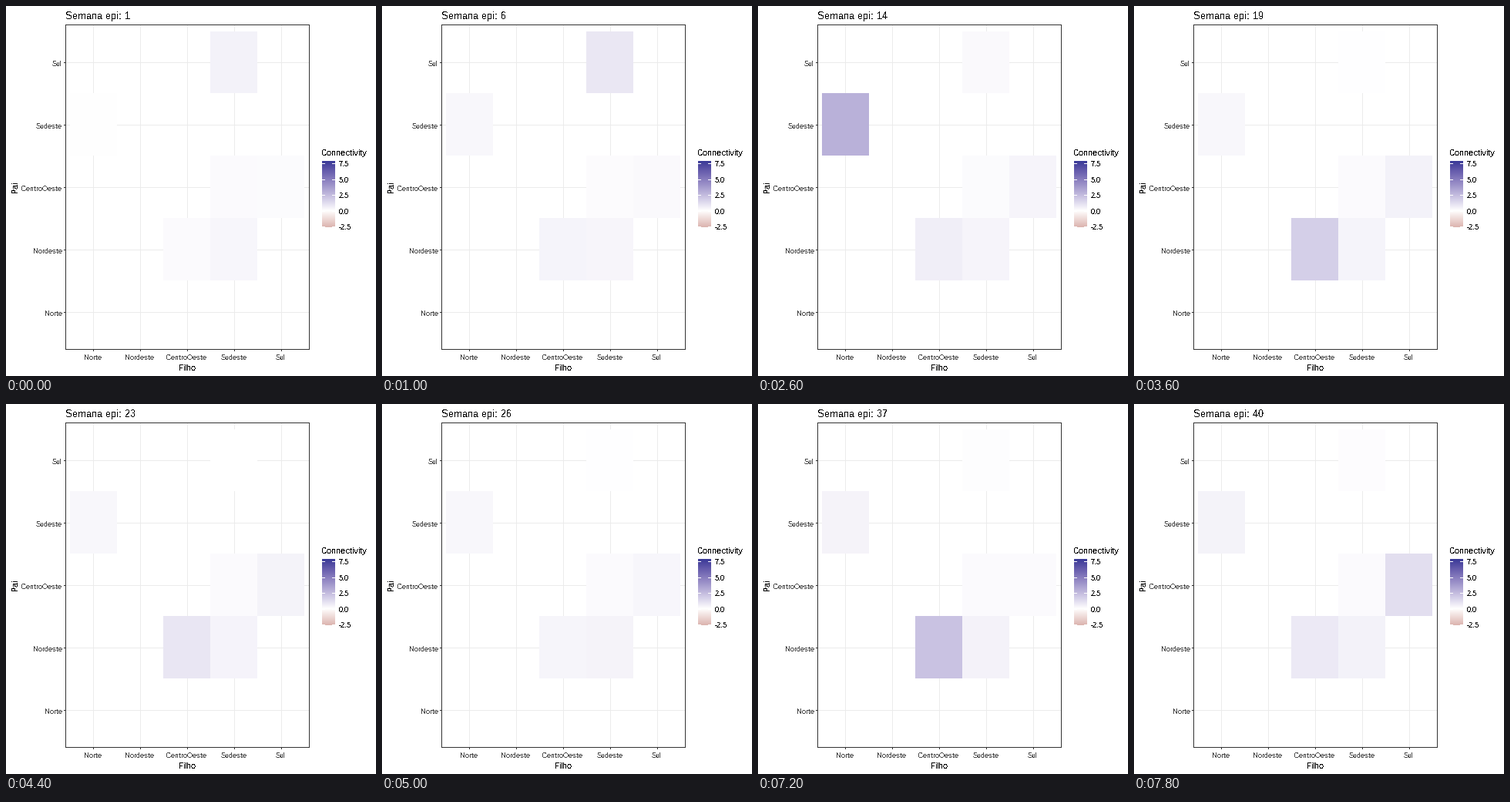
A matplotlib script for the animation above (8 s loop, 480 by 480 pixels).

```python
import numpy as np
import matplotlib.pyplot as plt
from matplotlib.animation import FuncAnimation
from matplotlib.patches import Rectangle

plt.rcParams.update({
    "font.family": "Liberation Sans",
    "text.hinting": "native",
    "text.hinting_factor": 1,
    "text.antialiased": False,
})

SIZE, DPI = 480, 100
WEEKS, STEP_MS = 40, 200
V_MIN, V_MAX = -2.6, 7.9
INK, FRAME, GREY, GRID = "#000000", "#333333", "#4d4d4d", "#ebebeb"
LEFT, TOP, RIGHT, BOTTOM = 77, 24, 394, 446
REGIONS = ["Norte", "Nordeste", "CentroOeste", "Sudeste", "Sul"]

# (child, parent): first level, last level, waves of (peak week, height, width)
FLOWS = {
    ("Sudeste", "Sul"): (-.1, .1, [(6, .97, 7)]),
    ("Norte", "Sudeste"): (.05, .45, [(12, 3.8, 3.5), (33, .4, 2)]),
    ("Sudeste", "CentroOeste"): (.17, .18, [(10, -.16, 3)]),
    ("Sul", "CentroOeste"): (.15, .15, [(10, .6, 2.5), (20, .34, 8), (40, 1.05, 1.5)]),
    ("CentroOeste", "Nordeste"): (.1, .28, [(4, .8, 2), (19, 1.6, 4.5), (36.5, 2.05, 3)]),
    ("Sudeste", "Nordeste"): (.33, .49, []),
}

RGB_XYZ = np.array([[.4124, .3576, .1805], [.2126, .7152, .0722], [.0193, .1192, .9505]])
WHITE_XYZ = RGB_XYZ.sum(axis=1)


def to_lab(rgb):
    c = np.array(rgb) / 255
    lin = np.where(c > .04045, ((c + .055) / 1.055) ** 2.4, c / 12.92)
    t = RGB_XYZ @ lin / WHITE_XYZ
    f = np.where(t > .008856, np.cbrt(t), 7.787 * t + 16 / 116)
    return np.array([116 * f[1] - 16, 500 * (f[0] - f[1]), 200 * (f[1] - f[2])])


def to_rgb(lab):
    fy = (lab[0] + 16) / 116
    f = np.array([fy + lab[1] / 500, fy, fy - lab[2] / 200])
    t = np.where(f > .2069, f ** 3, (f - 16 / 116) / 7.787)
    lin = np.clip(np.linalg.solve(RGB_XYZ, t * WHITE_XYZ), 0, 1)
    return np.clip(np.where(lin > .0031308, 1.055 * lin ** (1 / 2.4) - .055, 12.92 * lin), 0, 1)


LOW, MID, HIGH = to_lab((131, 36, 36)), to_lab((255, 255, 255)), to_lab((58, 58, 152))


def shade(value):
    end = HIGH if value > 0 else LOW
    return to_rgb(MID + (end - MID) * abs(value) / V_MAX)


def level(week, first, last, waves):
    trend = first + (last - first) * (week - 1) / (WEEKS - 1)
    return trend + sum(h * np.exp(-((week - peak) / w) ** 2) for peak, h, w in waves)


fig = plt.figure(figsize=(SIZE / DPI, SIZE / DPI), dpi=DPI, facecolor="white")
ax = fig.add_axes([0, 0, 1, 1])
ax.axis("off")


def box(x0, y0, x1, y1, color, z=1):
    patch = Rectangle((x0, y0), x1 - x0, y1 - y0, fc=color, lw=0, antialiased=False, zorder=z)
    return ax.add_patch(patch)


def label(x, y, text, px, color=INK, ha="left", va="baseline", **kw):
    return ax.text(x, y, text, fontsize=px * 72 / DPI, color=color, ha=ha, va=va, **kw)


def cell(child, parent):
    col, row = REGIONS.index(child), 4 - REGIONS.index(parent)
    x0, x1 = (int(83.3 + 60.75 * k) for k in (col, col + 1))
    y0, y1 = (int(33 + 80.85 * k) for k in (row, row + 1))
    return box(x0, y0, x1, y1, "white", 2)


def legend(x0, y0, x1, y1):
    bar = [[shade(v)] for v in np.linspace(V_MAX, V_MIN, y1 - y0)]
    ax.imshow(bar, extent=(x0, x1, y1, y0), aspect="auto", interpolation="nearest")
    label(x0, y0 - 7, "Connectivity", 11)
    for v in np.arange(-2.5, 7.6, 2.5):
        y = round(y0 + (V_MAX - v) / (V_MAX - V_MIN) * (y1 - y0))
        box(x0, y, x0 + 4, y + 1, "white", 3)
        box(x1 - 4, y, x1, y + 1, "white", 3)
        label(x1 + 5, y + 4, f"{v:.1f}", 9)


legend(410, 201, 427, 287)
ax.set_xlim(0, SIZE)
ax.set_ylim(SIZE, 0)

# Grid, ticks and region names
for k, name in enumerate(REGIONS):
    x, y = 113 + 61 * k, 397 - 81 * k
    box(x, TOP, x + 1, BOTTOM, GRID)
    box(LEFT, y, RIGHT, y + 1, GRID)
    box(x, BOTTOM, x + 1, BOTTOM + 2, FRAME)
    box(LEFT - 2, y, LEFT, y + 1, FRAME)
    label(x - .5, 459, name, 9, GREY, "center")
    label(73, y + 5, name, 9, GREY, "right")

# Panel border
for x in (LEFT, RIGHT - 1):
    box(x, TOP, x + 1, BOTTOM, FRAME, 4)
for y in (TOP, BOTTOM - 1):
    box(LEFT, y, RIGHT, y + 1, FRAME, 4)

label(235, 473, "Filho", 11, ha="center")
label(17, 235.5, "Pai", 11, ha="right", va="center", rotation=90)
title = label(LEFT, 17, "", 13)
cells = {pair: cell(*pair) for pair in FLOWS}


def draw(i):
    week = i + 1
    title.set_text(f"Semana epi: {week}")
    for pair, flow in FLOWS.items():
        cells[pair].set_facecolor(shade(level(week, *flow)))
    return [title, *cells.values()]


anim = FuncAnimation(fig, draw, frames=WEEKS, interval=STEP_MS, repeat=True, repeat_delay=0)
plt.show()
```
